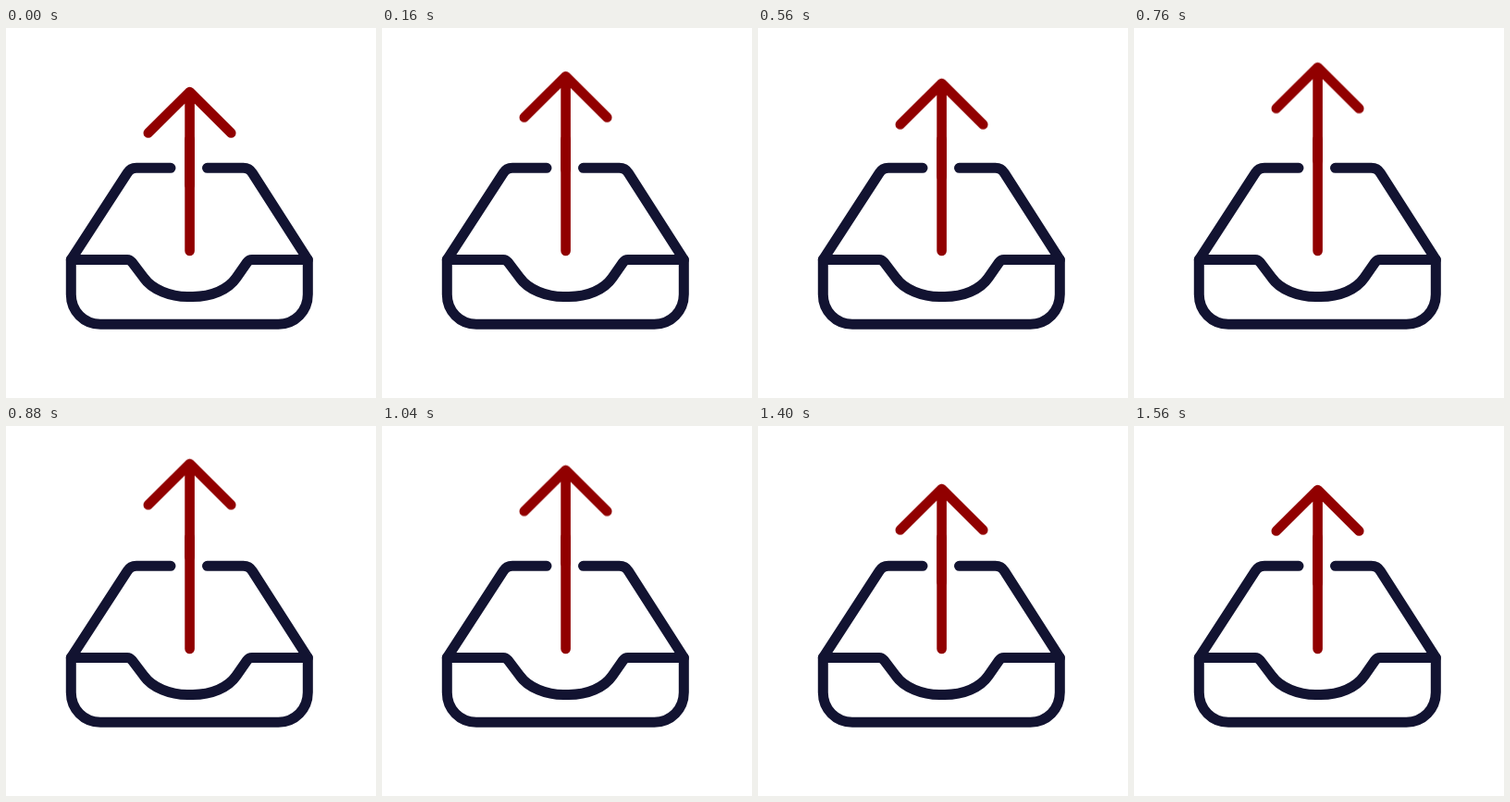
An HTML page for the animation above (1.64 s loop, 400 by 400 pixels).

```html
<!DOCTYPE html>
<html lang="en">
<head>
<meta charset="utf-8">
<title>Outbox</title>
<style>
  html, body { margin: 0; width: 100%; height: 100%; overflow: hidden; background: #fff; }
  svg { display: block; width: 100%; height: 100%; }
  path { fill: none; stroke-width: 11; stroke-linecap: round; stroke-linejoin: round; }
  .tray { stroke: #121331; }
  .arrow { stroke: #910000; stroke-width: 10.6; }
  .head { animation: lift 1640ms cubic-bezier(.333, 0, .667, 1) infinite; }

  /* Two hops, then a slow return to rest */
  @keyframes lift {
    0% { transform: translateY(0); }
    17.7% { transform: translateY(-29px); }
    33.8% { transform: translateY(-9.2px); }
    50% { transform: translateY(-29px); }
    90.2%, 100% { transform: translateY(0); }
  }
</style>
</head>
<body>
<svg viewBox="0 0 400 400">
  <g>
    <path class="tray" d="M178 151.3H141Q134.5 151.3 131 157L70.3 250.4V288C70.3 306 84 320.2 102 320.2H294.5C312.5 320.2 326.3 306 326.3 288V250.4L266.5 157Q263 151.3 256.5 151.3H217.5"/>
    <path class="tray" d="M70.3 250.4H131Q134 250.4 136.5 253.5L149 270C158 283 178 290.5 196 290.5H202C222 290.5 240 283 249 270L260.5 253.5Q262.7 250.4 266 250.4H326.3"/>
  </g>
  <!-- The moving stem overlaps the fixed one, so the arrow stretches -->
  <path class="arrow" d="M198.6 120V241"/>
  <path class="arrow head" d="M153.8 113.5L198.6 69L243.3 113.5M198.6 69V170"/>
</svg>
</body>
</html>
```
